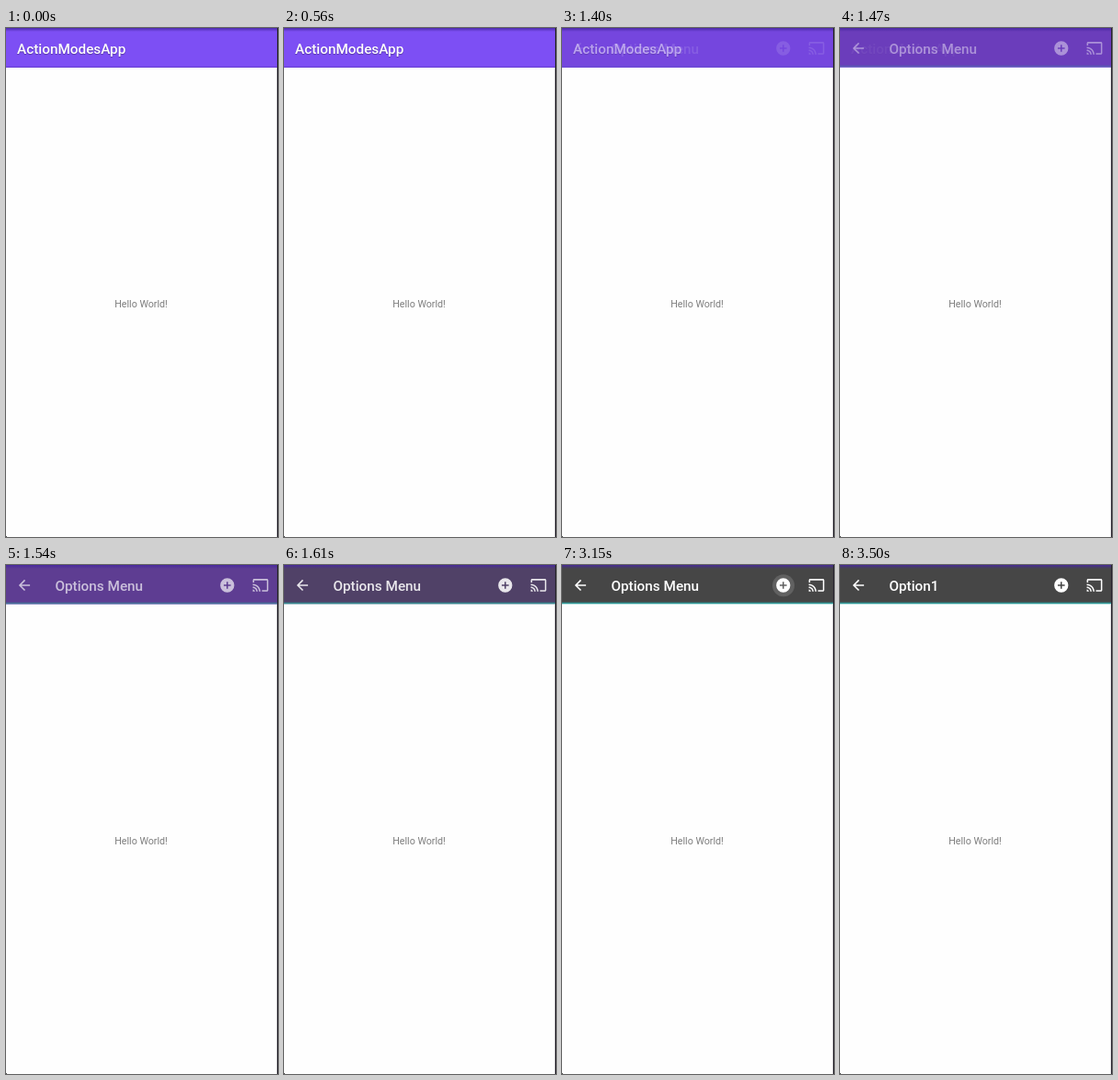
These frames come from a looping animation (296x552 px, 5390 ms). An HTML page:

```html
<!DOCTYPE html>
<html lang="en">
<head>
<meta charset="utf-8">
<title>Action mode</title>
<style>
html, body { margin: 0; height: 100%; overflow: hidden; background: #fefefe; }
svg { display: block; width: 296px; height: 552px; font-family: Roboto, sans-serif; }
.title { font-size: 15.3px; font-weight: 500; fill: #fff; }
</style>
</head>
<body>
<svg viewBox="0 0 296 552">
  <defs>
    <linearGradient id="edge" x2="0" y2="1">
      <stop offset="0" stop-color="#4526a0" stop-opacity=".9"/>
      <stop offset="1" stop-color="#4526a0" stop-opacity="0"/>
    </linearGradient>
  </defs>
  <text x="118.2" y="302.6" font-size="10.7" fill="#7d7d7d">Hello World!</text>

  <rect id="bar" width="295" height="43"/>
  <rect id="rim" y="41.8" width="295" height="1.2" fill="#6a41d6"/>
  <g id="line">
    <rect y="40.6" width="295" height="1.4" fill="#349b9b"/>
    <rect y="42" width="295" height="1" fill="#c2e6e4"/>
  </g>
  <rect width="295" height="4" fill="url(#edge)"/>
  <text id="app" class="title" x="12" y="28.4" style="text-shadow: 0 1px 1px #0005">ActionModesApp</text>

  <circle id="ripple" cx="241" cy="22.2" fill="#fff"/>
  <g id="mode" fill="#fff">
    <text id="label" class="title" x="53.4" y="28.4"></text>
    <path transform="translate(10.8 12.8) scale(.765)" d="M20 11H7.83l5.59-5.59L12 4l-8 8 8 8 1.41-1.41L7.83 13H20z"/>
    <path transform="translate(231.6 12.8) scale(.765)" d="M12 2a10 10 0 1 0 0 20 10 10 0 1 0 0-20zm5 11h-4v4h-2v-4H7v-2h4V7h2v4h4z" fill-rule="evenodd"/>
    <path transform="translate(267.8 12.8) scale(.765)" d="M21 3H3c-1.1 0-2 .9-2 2v3h2V5h18v14h-7v2h7c1.1 0 2-.9 2-2V5c0-1.1-.9-2-2-2zM1 18v3h3c0-1.66-1.34-3-3-3zm0-4v2c2.76 0 5 2.24 5 5h2c0-3.87-3.13-7-7-7zm0-4v2c4.97 0 9 4.03 9 9h2c0-6.08-4.93-11-11-11z"/>
  </g>

  <rect x="294" y="43" width="1" height="509" fill="#e4e4e4"/>
  <rect x="295" width="1" height="552" fill="#25222c"/>
  <rect y="551" width="1" height="1" fill="#555"/>
</svg>
<script>
const LOOP = 5390, STEP = 70, OPEN = 1330, TAP = 3150;
const el = id => document.getElementById(id);

// Opening steps: bar colour, old title opacity, new content opacity
const fade = [
  ['#7d4ff4', 1, 0],
  ['#7546de', .5, .12],
  ['#6b3dbb', .05, .43],
  ['#5e3d92', 0, .67],
  ['#504167', 0, .87],
  ['#464646', 0, 1]
];
// Ripple steps: radius, opacity
const ripple = [[12, .15], [14, .17], [15, .15], [15, .09], [15, .04]];

function draw(now) {
  const t = Math.floor(now % LOOP / STEP) * STEP;
  const i = Math.max(0, Math.min(fade.length - 1, (t - OPEN) / STEP));
  const [color, oldAlpha, newAlpha] = fade[i];
  el('bar').setAttribute('fill', color);
  el('app').setAttribute('opacity', oldAlpha);
  el('mode').setAttribute('opacity', newAlpha);
  el('line').setAttribute('opacity', newAlpha ** 1.5);
  el('rim').setAttribute('opacity', 1 - newAlpha);
  el('label').textContent = t < TAP + 2 * STEP ? 'Options Menu' : 'Option1';

  const [r, alpha] = ripple[(t - TAP) / STEP] || [0, 0];
  el('ripple').setAttribute('r', r);
  el('ripple').setAttribute('opacity', alpha);
}

const start = performance.now();
function tick() {
  draw(performance.now() - start);
  requestAnimationFrame(tick);
}
tick();
</script>
</body>
</html>
```
